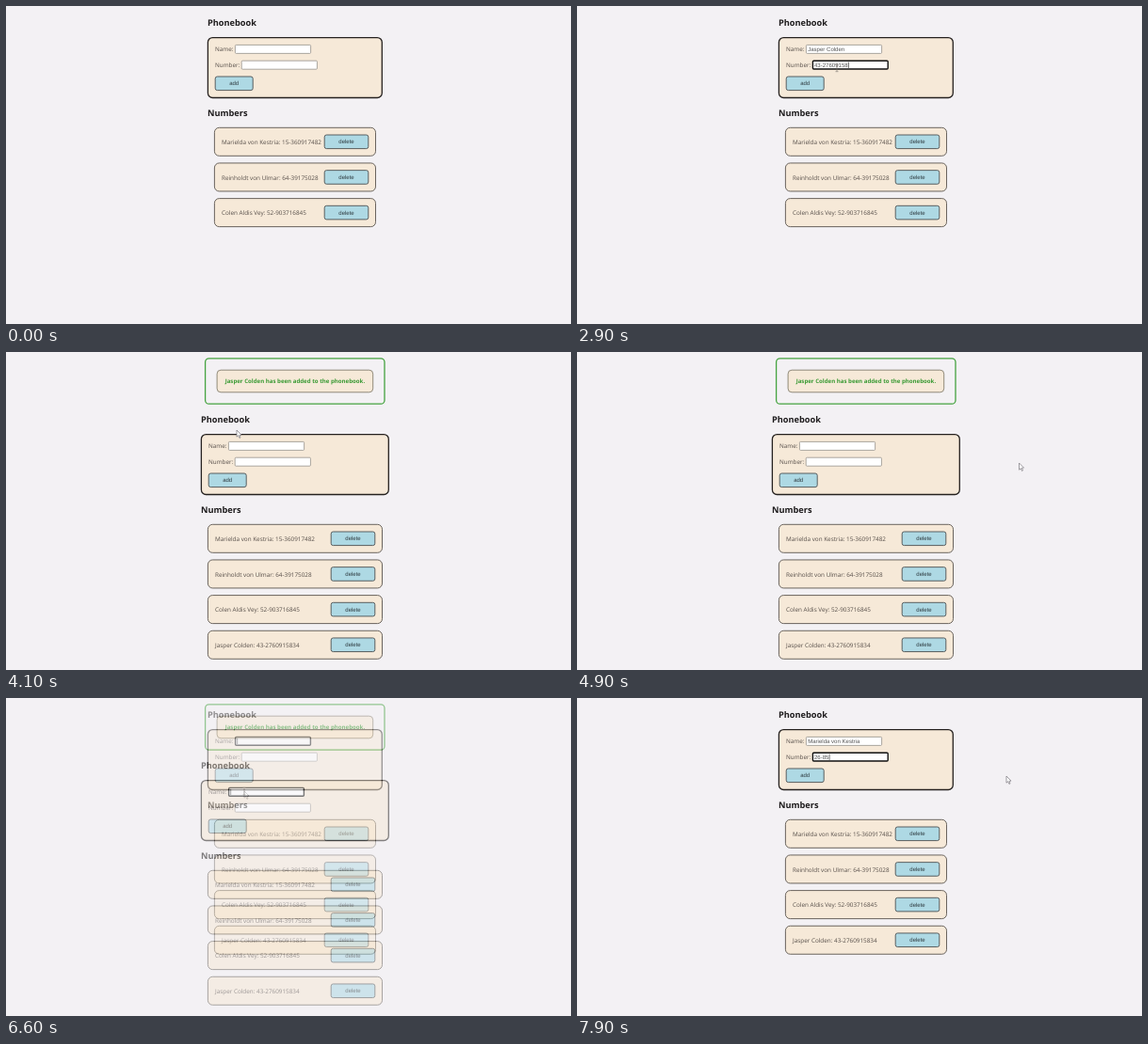
Animation of 600 by 338 pixels, one loop 8 s. Source, as an HTML page with a canvas:

```html
<!DOCTYPE html>
<html lang="en">
<head>
<meta charset="utf-8">
<title>Phonebook</title>
<style>
  html, body { margin: 0; width: 100%; height: 100%; overflow: hidden; background: #f3f1f4; }
  canvas { display: block; width: 600px; height: 338px; }
</style>
</head>
<body>
<canvas id="stage"></canvas>
<script>
const W = 600, H = 338, LOOP = 8000, STEP = 100;
const canvas = document.getElementById('stage');
const ctx = canvas.getContext('2d');
const dpr = window.devicePixelRatio || 1;
canvas.width = W * dpr;
canvas.height = H * dpr;

const BODY = '"Open Sans", sans-serif';
const FIELD = '"Liberation Sans", Arial, sans-serif';
const BG = '#f3f1f4', CARD = '#f6e9d8', BLUE = '#aed9e4';
const INK = '#1d1b1c', TEXT = '#564e49', GREEN = '#3a9a34';

const people = [
  ['Marielda von Kestria', '15-360917482'],
  ['Reinholdt von Ulmar', '64-39175028'],
  ['Colen Aldis Vey', '52-903716845'],
  ['Jasper Colden', '43-2760915834']
];
const [newName, newNumber] = people[3];
const editName = people[0][0], editNumber = '26-85';

// time, x, y of the pointer
const path = [
  [100, 443, 284], [300, 262, 46], [500, 262, 46], [800, 272, 79], [1200, 272, 79],
  [1600, 276, 66], [3200, 276, 66], [3700, 245, 83], [4200, 245, 83], [4500, 70, 120],
  [4800, 416, 66], [5000, 523, 170], [5400, 113, 303], [5700, 219, 198],
  [6300, 253, 99], [6700, 253, 99], [7100, 456, 83], [8000, 456, 83]
];

function box(x, y, w, h, r, fill, stroke, line) {
  ctx.beginPath();
  ctx.roundRect(x, y, w, h, r);
  if (fill) { ctx.fillStyle = fill; ctx.fill(); }
  ctx.strokeStyle = stroke;
  ctx.lineWidth = line;
  ctx.stroke();
}

function text(str, x, y, font, color, align = 'left') {
  ctx.font = font;
  ctx.fillStyle = color;
  ctx.textAlign = align;
  ctx.fillText(str, x, y);
}

function button(label, x, y, w) {
  box(x, y, w, 14.6, 2.2, BLUE, '#4b5052', 0.9);
  text(label, x + w / 2, y + 9.3, `6px ${FIELD}`, '#2e3a3f', 'center');
}

function input(x, y, value, focused) {
  if (focused) box(x + 0.4, y, 79.8, 8.8, 1, '#fff', '#111', 1.4);
  else box(x + 0.2, y, 80.2, 9, 1, '#fff', '#88857f', 0.7);
  text(value, x + 2, y + 6.5, `6.05px ${FIELD}`, '#555');
  if (focused) {
    const end = x + 2.3 + ctx.measureText(value).width;
    ctx.fillStyle = '#111';
    ctx.fillRect(end, y + 1.4, 0.6, 6.2);
  }
}

function arrow(x, y) {
  const pts = [[0, 0], [0, 7.2], [1.7, 5.7], [2.9, 8.4], [4, 7.9], [2.9, 5.3], [5, 5.1]];
  ctx.beginPath();
  pts.forEach(([dx, dy]) => ctx.lineTo(x + dx, y + dy));
  ctx.closePath();
  ctx.fillStyle = '#fff';
  ctx.fill();
  ctx.strokeStyle = '#77747a';
  ctx.lineWidth = 0.7;
  ctx.stroke();
}

function beam(x, y) {
  ctx.strokeStyle = '#77716b';
  ctx.lineWidth = 0.6;
  ctx.beginPath();
  ctx.moveTo(x, y - 3.4);
  ctx.lineTo(x, y + 3.4);
  for (const d of [-3.7, 3.7]) {
    ctx.moveTo(x - 1.5, y + d);
    ctx.lineTo(x + 1.5, y + d);
  }
  ctx.stroke();
}

function pointer(t) {
  const i = path.findIndex(p => p[0] > t);
  if (i < 1) return null;
  const [t0, x0, y0] = path[i - 1], [t1, x1, y1] = path[i];
  const k = (t - t0) / (t1 - t0), e = k * k * (3 - 2 * k);
  return [x0 + (x1 - x0) * e, y0 + (y1 - y0) * e];
}

function notice() {
  box(211.6, 6.8, 190.4, 48.4, 4, null, '#45a340', 1.3);
  box(224.1, 19.2, 165.6, 23.6, 4, CARD, '#77705f', 0.8);
  text(`${newName} has been added to the phonebook.`, 306.9, 33.4,
    `bold 6.1px ${BODY}`, GREEN, 'center');
}

function page(s, mouse) {
  const x = s.notice ? 207 : 214;
  const dy = s.notice ? 54 : 0;
  const w = s.notice ? 199.5 : 185.5;
  ctx.fillStyle = BG;
  ctx.fillRect(0, 0, W, H);
  if (s.notice) notice();

  const label = `6.35px ${BODY}`, head = `bold 9.2px ${BODY}`;
  text('Phonebook', x, 21.2 + dy, head, INK);
  box(x + 0.4, 33.6 + dy, w - 0.6, 63.9, 5, CARD, '#25211f', 1.3);
  const fields = [[x + 29.2, 41.4 + dy], [x + 36, 58.2 + dy]];
  text('Name:', x + 8, 48.1 + dy, label, TEXT);
  input(...fields[0], s.name, s.focus === 'name');
  text('Number:', x + 8, 64.9 + dy, label, TEXT);
  input(...fields[1], s.number, s.focus === 'number');
  button('add', x + 8.2, 75 + dy, 40);

  text('Numbers', x, 117.4 + dy, head, INK);
  people.slice(0, s.rows).forEach(([name, number], i) => {
    const y = 129.3 + dy + i * 37.65;
    box(x + 7.4, y, w - 14.4, 30, 5, CARD, '#5b554f', 0.9);
    text(`${name}: ${number}`, x + 15, y + 17.7, label, TEXT);
    button('delete', x + w - 61.3, y + 7.7, 46.6);
  });

  if (!mouse) return;
  const [mx, my] = mouse;
  const over = fields.some(([fx, fy]) => mx > fx && mx < fx + 80 && my > fy && my < fy + 9);
  (over ? beam : arrow)(mx, my);
}

const typed = (str, n) => str.slice(0, Math.max(0, Math.floor(n)));

function adding(t) {
  return {
    rows: 3,
    focus: t < 300 ? '' : t < 1700 ? 'name' : 'number',
    name: typed(newName, (t - 300) / 700 * newName.length),
    number: typed(newNumber, (t - 1800) / 100 - (t >= 3000))
  };
}

function added(t) {
  return { rows: 4, notice: true, focus: t < 6400 ? '' : 'name', name: '', number: '' };
}

function editing(t) {
  return {
    rows: 4,
    focus: t < 7200 ? 'name' : 'number',
    name: typed(editName, (t - 6600) / 500 * editName.length),
    number: typed(editNumber, (t - 7300) / 100 - (t >= 7700))
  };
}

function draw(t) {
  const mouse = pointer(t);
  ctx.setTransform(dpr, 0, 0, dpr, 0, 0);
  ctx.textRendering = 'geometricPrecision';
  ctx.globalAlpha = 1;
  if (t < 4000) page(adding(t), mouse);
  else if (t < 6600) page(added(t), mouse);
  else if (t >= 6700) page(editing(t), mouse);
  else blend(t, mouse);
}

// one step of cross-fade between the two pages
const layer = document.createElement('canvas');
layer.width = canvas.width;
layer.height = canvas.height;

function blend(t, mouse) {
  page(editing(t), mouse);
  layer.getContext('2d').drawImage(canvas, 0, 0);
  page(added(t), mouse);
  ctx.globalAlpha = 0.45;
  ctx.drawImage(layer, 0, 0, W, H);
  ctx.globalAlpha = 1;
}

const start = performance.now();
function tick() {
  const t = (performance.now() - start) % LOOP;
  draw(Math.floor(t / STEP) * STEP);
  requestAnimationFrame(tick);
}
tick();
</script>
</body>
</html>
```
